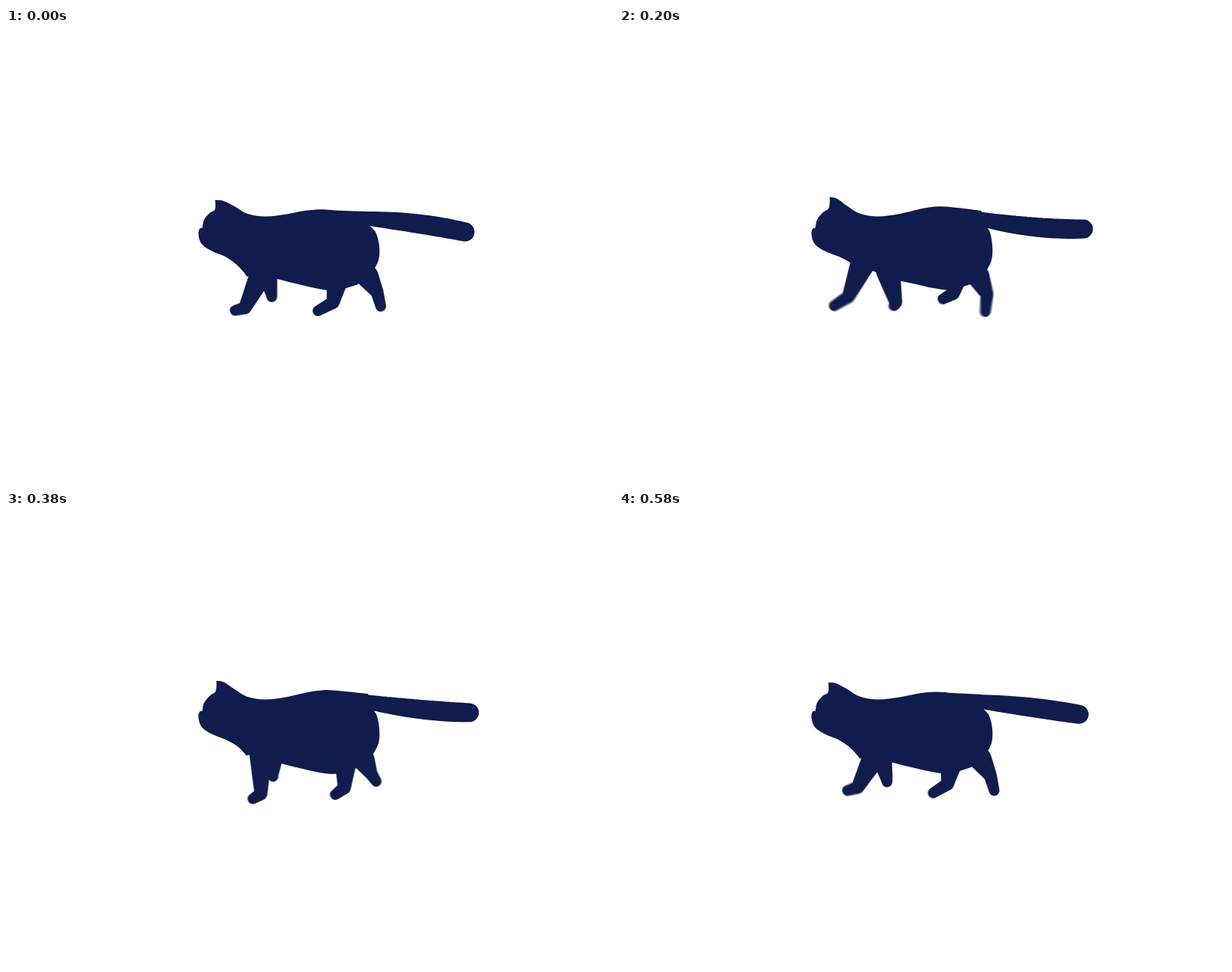
Write an HTML page with a canvas that moves like this. It is 800 px wide and 600 px high and loops after 600 ms.

```html
<!DOCTYPE html>
<html lang="en">
<head>
<meta charset="utf-8">
<title>Walking cat</title>
<style>
html, body { margin: 0; width: 100%; height: 100%; overflow: hidden; background: #fff; }
canvas { display: block; }
</style>
</head>
<body>
<canvas id="stage" width="800" height="600"></canvas>
<script>
const LOOP = 600, STEP = 20, INK = '#0f1c4d';
const ctx = document.getElementById('stage').getContext('2d');

// Each stride lists [heel x, heel y, toe x, toe y] at these times.
const TIMES = [0, 80, 160, 240, 380, 500];

// The hip stays in the body and follows the heel by a share of its travel.
const front = (x, y, rest, follow, stride) => ({ x, y, r: 16, rest, follow, stride });
const hind = stride => ({ x: 440, y: 327, r: 15, rest: 434, follow: 0.65, stride });
const legs = [
  front(346, 320, 338, 0.32, [
    [315, 369, 302, 372.5], [328, 371, 317.5, 376.5], [356, 367, 347.5, 370.5],
    [368, 356, 371, 362], [351, 346, 352, 350], [321, 342, 308, 350.5]]),
  front(342, 312, 350, 0.45, [
    [349, 346, 350.5, 354.5], [316, 338, 312, 349], [299, 344, 276.5, 359.5],
    [310, 364, 297, 372], [336, 373, 325.5, 379.5], [352, 366, 349, 370]]),
  hind([
    [431, 362, 411, 373], [438, 371, 424.5, 376], [472, 356, 464, 377],
    [492, 348, 495, 370], [481, 346, 488, 356.5], [449, 354, 440, 366]]),
  hind([
    [489, 348, 494, 367], [469, 348, 460, 355], [447, 346, 434, 352.5],
    [438, 355, 424.5, 363], [446, 365, 434, 374], [480, 355, 478, 372]])
];

// Torso at the low point of the bob; a third value marks a sharp corner.
const torso = [
  [275.5, 227, 1], [285, 227.5], [300, 234.5], [317, 244.5], [341, 248.5], [370, 245.5],
  [395, 240.8], [417, 239.2], [440, 240.8], [476, 242, 1], [478, 260, 1], [487, 269],
  [492, 288], [491, 306], [484, 320, 1], [464, 338, 1], [435, 346], [415, 344.5],
  [390, 339], [360, 331.5], [330, 322, 1], [318, 328, 1], [306, 314], [290, 302],
  [271, 294], [258, 285], [253.7, 273], [255, 265], [259, 263.5, 1], [261, 253],
  [269, 243.5], [275, 240], [276, 233]
];

const mod = (a, n) => ((a % n) + n) % n;

// Cyclic cubic interpolation through the key poses.
function poseAt(rows, time) {
  const n = TIMES.length, t = mod(time, LOOP);
  const i = TIMES.findLastIndex(k => k <= t);
  const key = k => TIMES[mod(k, n)] + LOOP * Math.floor(k / n);
  const [a, b, c, d] = [-1, 0, 1, 2].map(k => rows[mod(i + k, n)]);
  const h = key(i + 1) - key(i), u = (t - key(i)) / h, v = 1 - u;
  const s0 = h / (key(i + 1) - key(i - 1)), s1 = h / (key(i + 2) - key(i));
  return b.map((p, k) =>
    v * v * (1 + 2 * u) * p + u * u * (3 - 2 * u) * c[k] +
    u * v * v * s0 * (c[k] - a[k]) - u * u * v * s1 * (d[k] - p));
}

// Adds the hull of two circles.
function taper(x0, y0, r0, x1, y1, r1) {
  const dx = x1 - x0, dy = y1 - y0, dir = Math.atan2(dy, dx);
  const ratio = (r0 - r1) / (Math.hypot(dx, dy) || 1);
  const a = Math.acos(Math.max(-1, Math.min(1, ratio)));
  ctx.moveTo(x0 + r0 * Math.cos(dir + a), y0 + r0 * Math.sin(dir + a));
  ctx.arc(x0, y0, r0, dir + a, dir - a + 2 * Math.PI);
  ctx.arc(x1, y1, r1, dir - a, dir + a);
  ctx.closePath();
}

// Adds a smooth closed outline.
function outline(pts) {
  const n = pts.length, at = i => pts[mod(i, n)];
  const dir = i => {
    if (at(i)[2]) return [0, 0];
    const dx = at(i + 1)[0] - at(i - 1)[0], dy = at(i + 1)[1] - at(i - 1)[1];
    const len = Math.hypot(dx, dy);
    return [dx / len, dy / len];
  };
  ctx.moveTo(pts[0][0], pts[0][1]);
  for (let i = 0; i < n; i++) {
    const [x0, y0] = at(i), [x1, y1] = at(i + 1);
    const [dx0, dy0] = dir(i), [dx1, dy1] = dir(i + 1);
    const r = Math.hypot(x1 - x0, y1 - y0) / 3;
    ctx.bezierCurveTo(x0 + dx0 * r, y0 + dy0 * r, x1 - dx1 * r, y1 - dy1 * r, x1, y1);
  }
  ctx.closePath();
}

function drawLegs(t) {
  // Four summed exposures give the feet their slight motion blur.
  ctx.globalCompositeOperation = 'lighter';
  ctx.globalAlpha = 0.25;
  for (const shift of [-4, -1.3, 1.3, 4]) {
    ctx.beginPath();
    for (const leg of legs) {
      const [hx, hy, tx, ty] = poseAt(leg.stride, t + shift);
      taper(leg.x + leg.follow * (hx - leg.rest), leg.y, leg.r, hx, hy, 8.5);
      taper(hx, hy, 8.5, tx, ty, 7);
    }
    ctx.fill();
  }
  ctx.globalCompositeOperation = 'source-over';
  ctx.globalAlpha = 1;
}

function drawTorso(bob) {
  const sag = 4.5 * Math.sin(Math.PI * bob) ** 2;
  // Soft pulls on the outline: centre, reach, shift.
  const pulls = [
    [277, 227, 14, 3 * bob, -5.5 * bob],
    [430, 238, 40, 5 * bob, -6 * bob],
    [478, 260, 12, 7 * bob, 2 * bob],
    [315, 325, 20, -2 * bob, -10 * bob],
    [400, 340, 50, 0, sag - 6 * bob]
  ];
  ctx.beginPath();
  outline(torso.map(([x, y, corner]) => {
    let px = x, py = y;
    for (const [cx, cy, reach, dx, dy] of pulls) {
      const w = Math.exp(-((x - cx) ** 2 + (y - cy) ** 2) / reach ** 2);
      px += dx * w;
      py += dy * w;
    }
    return [px, py, corner];
  }));
  ctx.fill();
}

function drawTail(bob) {
  const curve = (a, b, c, u) => (1 - u) ** 2 * a + 2 * u * (1 - u) * b + u * u * c;
  const joint = u => [
    curve(472, 545, 605 + 10 * bob, u),
    curve(251, 256 + 14 * bob, 269 - 5.5 * bob, u),
    9 + 11 * u - 7.5 * u * u
  ];
  const parts = 20;
  ctx.beginPath();
  for (let i = 0; i < parts; i++) taper(...joint(i / parts), ...joint((i + 1) / parts));
  ctx.fill();
}

function frame(now) {
  const t = Math.floor(mod(now, LOOP) / STEP) * STEP;
  const half = LOOP / 4;
  const bob = 1.07 * (1 - Math.abs(t % (2 * half) - half) / half);
  ctx.clearRect(0, 0, 800, 600);
  ctx.fillStyle = INK;
  drawLegs(t);
  drawTorso(bob);
  drawTail(bob);
  requestAnimationFrame(frame);
}
frame(0);
</script>
</body>
</html>
```
